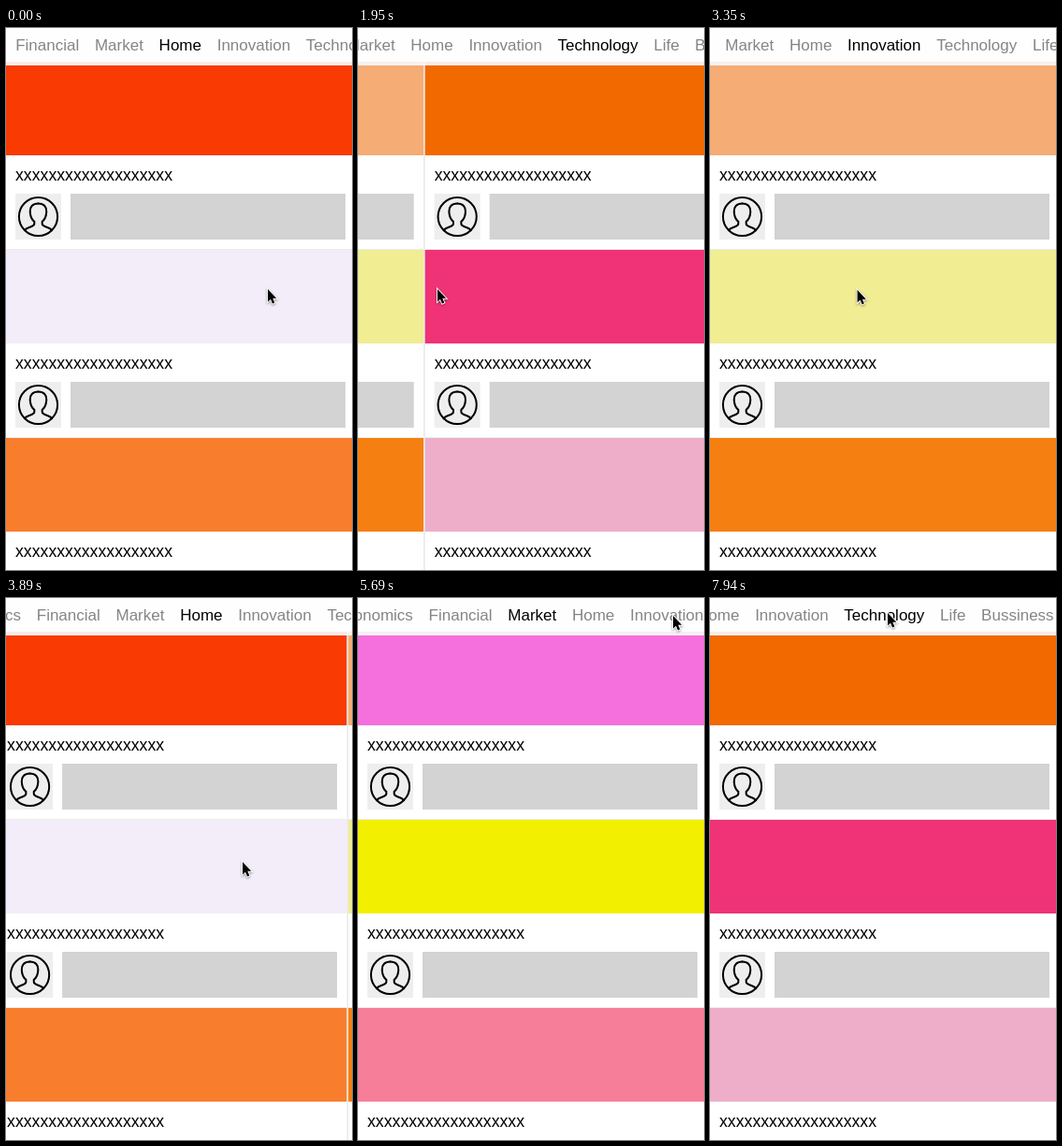
An HTML page that plays this animation: 370x579 px, repeating every 8000 ms.

```html
<!DOCTYPE html>
<html lang="en">
<head>
<meta charset="utf-8">
<title>Paged tabs</title>
<style>
  html, body { margin: 0; width: 100%; height: 100%; overflow: hidden; background: #fff; }
  svg { display: block; width: 370px; height: 579px; }
  text { font-family: "Liberation Sans", Arial, sans-serif; }
  #tabs text { font-size: 17px; fill: #858585; }
  #tabs text.active { fill: #000; }
  .caption { font-size: 17.7px; }
  .line { fill: none; stroke: #000; stroke-width: 2; stroke-linecap: round; }
  #cursor { filter: drop-shadow(0 1px 1px rgba(0, 0, 0, .4)); }
</style>
</head>
<body>
<svg viewBox="0 0 370 579" xmlns="http://www.w3.org/2000/svg">
  <defs>
    <path id="half" d="M0 -14c-6.2 0-9 3.800-8.800 8.600 .2 4.600 1.600 8.400 4.600 10.600v2.600c0 2.200-2.500 2.600-5.500 3.700-2.600 .9-4.100 2-4.800 3.200"/>
    <g id="row">
      <text class="caption" x="10" y="126.5">xxxxxxxxxxxxxxxxxxx</text>
      <rect x="10" y="141" width="49" height="49" fill="#eee"/>
      <g class="line" transform="translate(34.5 165.5)">
        <circle r="20.6"/>
        <use href="#half"/>
        <use href="#half" transform="scale(-1 1)"/>
      </g>
      <rect x="69" y="141" width="294" height="49" fill="#d3d3d3"/>
      <rect y="200" width="373" height="1" fill="#ececec"/>
    </g>
  </defs>
  <rect width="370" height="579" fill="#fff"/>
  <g id="pages"></g>
  <rect width="370" height="36" fill="#fefefe"/>
  <rect y="36" width="370" height="4" fill="#f8f6f6" fill-opacity=".95"/>
  <g id="tabs"></g>
  <path id="cursor" d="M0 0V13.500L3 10.700 5 15.500 7.300 14.500 5.300 9.800H9.300Z" fill="#000" stroke="#fff" stroke-width="1.800" paint-order="stroke"/>
</svg>
<script>
const LOOP = 8000, PITCH = 375, ROW = 201;
const TAB_GAP = 16.7, TAB_CENTER = 186.3;
const $ = id => document.getElementById(id);

const names = ["Economics", "Financial", "Market", "Home", "Innovation",
  "Technology", "Life", "Bussiness", "Economics"];
const colors = {
  Market: ["#f56fdd", "#f2f000", "#f77e98"],
  Home: ["#f93a02", "#f2edf8", "#f87e2d"],
  Innovation: ["#f5ac75", "#f0ed93", "#f58011"],
  Technology: ["#f26900", "#ef3376", "#eeaec9"]
};
const [MARKET, HOME, INNOVATION, TECHNOLOGY] = Object.keys(colors).map(n => names.indexOf(n));

// Swipes drag the cursor from one point to another; clicks have no end point; the rest only hover.
const gestures = [
  { at: 830, page: INNOVATION, from: [280, 279], to: [156, 279] },
  { leave: 1330, at: 1730, page: TECHNOLOGY, from: [230, 279], to: [85, 279] },
  { leave: 2560, at: 2560, page: INNOVATION, from: [85, 279], to: [229, 279] },
  { leave: 3230, at: 3545, page: HOME, from: [60, 281], to: [253, 282] },
  { leave: 3900, at: 4430, page: MARKET, from: [50, 238], to: [239, 246] },
  { leave: 4770, from: [260, 84] },
  { leave: 5280, at: 5900, page: INNOVATION, from: [337, 19] },
  { leave: 6560, at: 7160, page: TECHNOLOGY, from: [263, 19] },
  { leave: 7690, from: [189, 16] }
];

const clamp = p => Math.min(1, Math.max(0, p));
const smooth = p => (p = clamp(p), p * p * (3 - 2 * p));
const mix = (a, b, p) => a + (b - a) * p;
const mixPoint = (a, b, p) => a.map((v, i) => mix(v, b[i], p));

// A finger drags the page at constant speed, then it glides to rest exponentially.
const DRAG = 150, SPEED = .94, GLIDE = 60;
const FLIP = DRAG + GLIDE * Math.log((PITCH - DRAG * SPEED) / (PITCH / 2));
const travel = s => s < DRAG ? s * SPEED
  : PITCH - (PITCH - DRAG * SPEED) * Math.exp((DRAG - s) / GLIDE);

function pose(t) {
  let page = HOME, scroll = HOME * PITCH, strip = rest(HOME), cursor = gestures[0].from;
  for (const g of gestures) {
    if (g.leave) cursor = mixPoint(cursor, g.from, smooth((t - g.leave) / 270));
    if (g.to) cursor = mixPoint(cursor, g.to, smooth((t - g.at) / 170));
    const s = t - g.at;
    if (!(s >= 0)) continue;
    if (g.to) {
      // The tab strip first backs off, then overshoots its new centre and settles.
      const dir = Math.sign(g.page - page);
      const settle = clamp((s - FLIP) / 450);
      const before = strip + dir * .19 * travel(s);
      const after = rest(g.page) - dir * 27 * (1 - settle ** 2);
      strip = mix(before, after, smooth((s - FLIP) / 120));
      scroll = page * PITCH + dir * travel(s);
    } else {
      strip = mix(strip, rest(g.page), smooth(s / 180));
      scroll = g.page * PITCH;
    }
    page = g.page;
  }
  return { scroll, strip, cursor };
}

$("tabs").innerHTML = names.map(name => `<text y="24">${name}</text>`).join("");
const labels = [...$("tabs").children];
const centers = [];
let edge = 0;
for (const label of labels) {
  const width = label.getComputedTextLength();
  label.setAttribute("x", edge);
  centers.push(edge + width / 2);
  edge += width + TAB_GAP;
}
const rest = i => TAB_CENTER - centers[i];

$("pages").innerHTML = names.map((name, i) => name in colors ? `
  <g transform="translate(${i * PITCH} 36)">
    ${colors[name].map((color, r) => `<g transform="translate(0 ${r * ROW})">
      <rect width="373.5" height="100" fill="${color}"/><use href="#row"/></g>`).join("")}
    <rect x="373.5" width="1.5" height="543" fill="#e8e8e8"/>
  </g>` : "").join("");

const move = (id, x, y = 0) => $(id).setAttribute("transform", `translate(${x} ${y})`);

function draw(t) {
  const { scroll, strip, cursor } = pose(t);
  const active = Math.round(scroll / PITCH);
  move("pages", -scroll);
  move("tabs", strip);
  move("cursor", ...cursor);
  labels.forEach((label, i) => label.classList.toggle("active", i === active));
}

const start = performance.now();
function frame() {
  draw((performance.now() - start) % LOOP);
  requestAnimationFrame(frame);
}
frame();
</script>
</body>
</html>
```
